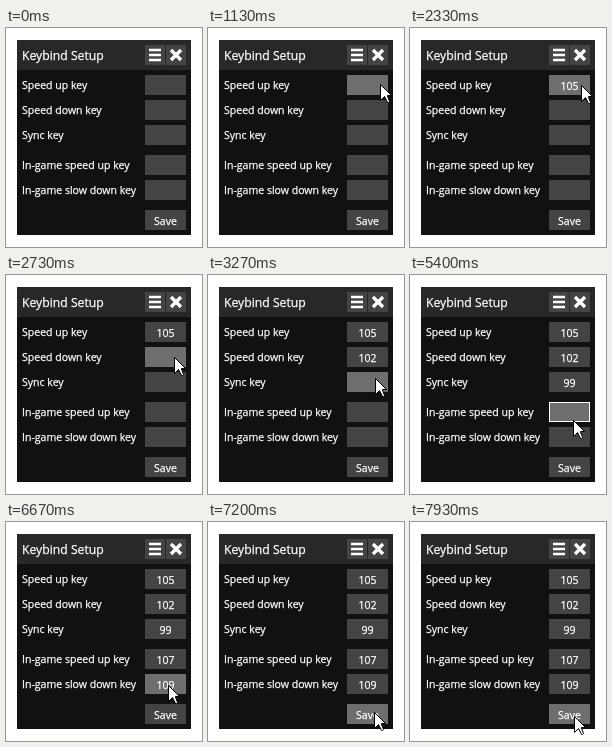
These frames come from a looping animation (196 px wide and 219 px high, 8000 ms). An HTML page:

```html
<!DOCTYPE html>
<html lang="en">
<head>
<meta charset="utf-8">
<title>Keybind Setup</title>
<style>
  html, body { margin: 0; width: 100%; height: 100%; overflow: hidden; background: #fff; }
  svg { display: block; width: 100vw; height: 100vh; }
  text { font: 10.55px "Open Sans", sans-serif; fill: #fff; stroke: #fff; stroke-width: .25px; }
  .title { font-size: 12.2px; }
  .value { text-anchor: middle; }
</style>
</head>
<body>
<svg viewBox="0 0 196 219">
  <rect x="11" y="12" width="174" height="195" fill="#111"/>
  <rect x="11" y="12" width="174" height="30" fill="#282828"/>
  <text class="title" x="16" y="32">Keybind Setup</text>
  <path d="M139 17h20v20h-20zM160 17h20v20h-20z" fill="#444"/>
  <path d="M143 22h12M143 27h12M143 32h12" stroke="#fff" stroke-width="2.3"/>
  <path d="M165 22l10 10M175 22l-10 10" stroke="#fff" stroke-width="3.3"/>
  <g id="rows"></g>
  <path id="cursor" d="M.5 .5V16.5L4.5 12.5 7.5 18.5H8.5L9.5 17.5 7.5 12V11.5H11.5Z"
        fill="#fff" stroke="#000" stroke-linejoin="round"/>
</svg>
<script>
const LOOP_TICKS = 120;
const TICK = 8000 / LOOP_TICKS;
const BOX = { x: 139, width: 41, height: 20 };

// Ticks at which a field is clicked and then filled.
const rows = [
  { label: "Speed up key", value: "105", clicked: 25, typed: 35 },
  { label: "Speed down key", value: "102", clicked: 43, typed: 46 },
  { label: "Sync key", value: "99", clicked: 53, typed: 61 },
  { label: "In-game speed up key", value: "107", clicked: 76, typed: 82 },
  { label: "In-game slow down key", value: "109", clicked: 92, typed: 100 },
  { label: "", value: "Save", clicked: 0, typed: 0 },
];

// The pointer glides to each stop in turn and rests there.
const entry = { x: 200, y: 40 };
const stops = [
  { from: 14, to: 19, x: 171, y: 57 },
  { from: 36, to: 41, x: 168, y: 82 },
  { from: 47, to: 53, x: 167, y: 108 },
  { from: 65, to: 68, x: 163, y: 135 },
  { from: 81, to: 87, x: 162, y: 163 },
  { from: 106, to: 109, x: 166, y: 190 },
  { from: 118, to: 119, x: 164, y: 194 },
];

const cursor = document.getElementById("cursor");
const rowGroup = document.getElementById("rows");

function add(tag, attributes, content = "") {
  const node = document.createElementNS("http://www.w3.org/2000/svg", tag);
  for (const name in attributes) node.setAttribute(name, attributes[name]);
  node.textContent = content;
  return rowGroup.appendChild(node);
}

rows.forEach((row, i) => {
  // Rows are 25 apart, with a wider gap between groups.
  row.y = 47 + 25 * i + (i > 2 ? 5 : 0) + (i > 4 ? 5 : 0);
  add("text", { x: 16, y: row.y + 14 }, row.label);
  row.box = add("rect", { ...BOX, y: row.y });
  row.border = add("rect", {
    x: BOX.x + .5, y: row.y + .5, width: BOX.width - 1, height: BOX.height - 1,
    fill: "none", stroke: "#fff",
  });
  row.text = add("text", { class: "value", x: BOX.x + BOX.width / 2, y: row.y + 14.5 }, row.value);
});

const easeOut = p => 1 - (1 - p) ** 3;

function pointerAt(tick) {
  let { x, y } = entry;
  for (const stop of stops) {
    if (tick < stop.from) break;
    const progress = easeOut(Math.min(1, (tick - stop.from + 1) / (stop.to - stop.from + 1)));
    x += (stop.x - x) * progress;
    y += (stop.y - y) * progress;
  }
  return { x: Math.round(x), y: Math.round(y) };
}

function show(node, visible) {
  node.setAttribute("visibility", visible ? "visible" : "hidden");
}

function draw(now) {
  // The small lead absorbs rounding of tick times to 10 ms.
  const tick = Math.floor((now + 4) / TICK) % LOOP_TICKS;
  const { x, y } = pointerAt(tick);
  cursor.setAttribute("transform", `translate(${x} ${y})`);
  show(cursor, tick >= stops[0].from);
  for (const row of rows) {
    const hovered = x >= BOX.x && x < BOX.x + BOX.width && y >= row.y && y < row.y + BOX.height;
    row.box.setAttribute("fill", hovered ? "#6e6e6e" : "#444");
    show(row.border, tick >= row.clicked && tick < row.typed);
    show(row.text, tick >= row.typed);
  }
}

const origin = performance.now();
function loop() {
  draw(performance.now() - origin);
  requestAnimationFrame(loop);
}
loop();
</script>
</body>
</html>
```
